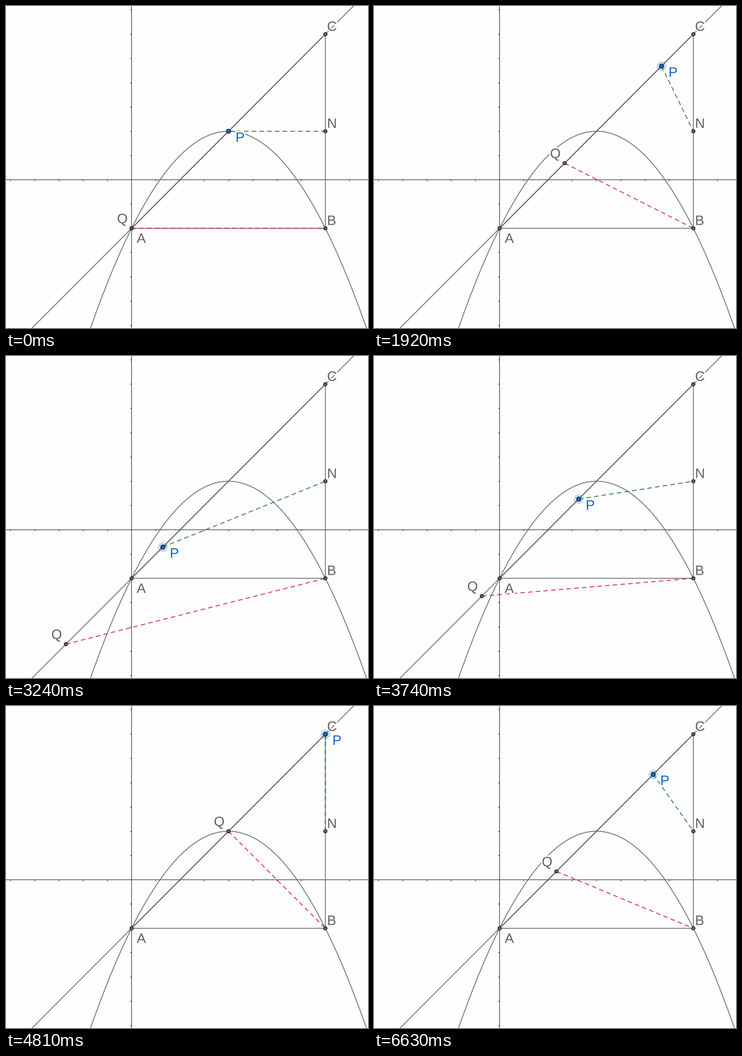
Recreate the animation shown at these times as a matplotlib script. Size 794 by 705 pixels, loop 7.02 s.

```python
import matplotlib.pyplot as plt
import numpy as np
from matplotlib.animation import FuncAnimation
from matplotlib.patches import Circle
from matplotlib.patheffects import withStroke

WIDTH, HEIGHT, DPI = 794, 705, 100
LOOP_MS, FRAME_MS = 7020, 20
DRAG_STEP_MS = 110
PX = 72 / DPI  # points per pixel

PAPER = "#fefefe"
GRAY, BLUE, RED, GREEN = "#616161", "#1565c0", "#d32f2f", "#2e7d32"
UNIT = 53.125
ORIGIN = np.array([275.5, 380.5])


def to_px(x, y):
    return ORIGIN + np.array([x, -y]) * UNIT


A, B, C, N = to_px(0, -2), to_px(8, -2), to_px(8, 6), to_px(8, 2)
VERTEX = to_px(4, 2)
P_TO_Q = A - VERTEX
DIAGONAL = A.sum()  # x + y along the line through A and C

# Drags of P: start ms, end ms, Bezier control x, final x.
DRAGS = [
    (610, 830, 499, 510.5),
    (1210, 1550, 556, 588),
    (1710, 2170, 637, 641),
    (2420, 3000, 487, 381.5),
    (3140, 3740, 280, 449),
    (3850, 4200, 560, 618),
    (4340, 4810, 675, C[0]),
    (5530, 5790, 688, 672.5),
    (6190, 6630, 751, 612.5),
]


def drag_x(t):
    """x of P, which moves in discrete steps along each eased drag."""
    x = VERTEX[0]
    for start, end, pull, target in DRAGS:
        if t < start:
            break
        steps = round((end - start) / DRAG_STEP_MS) + 1
        done = min(1 + (t - start) // DRAG_STEP_MS, steps - 1)
        u = 1 if t >= end else done / steps
        x = (1 - u) ** 2 * x + 2 * u * (1 - u) * pull + u ** 2 * target
    return x


fig = plt.figure(figsize=(WIDTH / DPI, HEIGHT / DPI), dpi=DPI, facecolor=PAPER)
ax = fig.add_axes([0, 0, 1, 1])
ax.set(xlim=(0, WIDTH), ylim=(HEIGHT, 0))
ax.axis("off")


def stroke(xs, ys, color=GRAY, width=2.1, alpha=0.8, z=2, **style):
    return ax.plot(xs, ys, color=color, lw=width * PX, alpha=alpha, zorder=z,
                   solid_capstyle="butt", snap=False, **style)[0]


def segment(start, end, **style):
    return stroke([start[0], end[0]], [start[1], end[1]], **style)


def dashed(color):
    return stroke([], [], color, width=2.2, alpha=0.85, z=3,
                  dashes=(4.6, 3.1), dash_capstyle="butt")


def label(text, pos, color=GRAY, z=4):
    return ax.text(*pos, text, color=color, family="Liberation Sans",
                   size=30 * PX, ha="left", va="baseline", zorder=z,
                   path_effects=[withStroke(linewidth=6 * PX, foreground=PAPER)])


def dot(pos, radius=3.8, color=GRAY, z=5):
    return ax.add_patch(Circle(pos, radius, fc=color, ec="black",
                               lw=1.1 * PX, zorder=z))


def draw_axes():
    ox, oy = ORIGIN
    axis = dict(color="black", width=1, alpha=1, z=1)
    segment((0, oy), (WIDTH, oy), **axis)
    segment((ox, 0), (ox, HEIGHT), **axis)
    for k in range(-7, 10):
        x, y = np.floor(ORIGIN + k * UNIT) + 0.5
        segment((x, oy), (x, oy + 3), **axis)
        segment((ox - 3, y), (ox, y), **axis)


draw_axes()

curve_x = np.linspace(170, WIDTH + 10, 250)
stroke(curve_x, VERTEX[1] + (curve_x - VERTEX[0]) ** 2 / (4 * UNIT))
segment((DIAGONAL + 10, -10), (DIAGONAL - HEIGHT - 10, HEIGHT + 10))
for start, end in ((A, B), (B, C), (A, C)):
    segment(start, end)

label("A", A + (11.2, 32))
for name, point in zip("BCN", (B, C, N)):
    label(name, point + (3.7, -7.3))
for point in (A, B, C, N):
    dot(point)

red_line, green_line = dashed(RED), dashed(GREEN)
q_label, p_label = label("Q", A), label("P", VERTEX, BLUE, z=8)
q_dot = dot(A, z=6)
halo = ax.add_patch(Circle(VERTEX, 10, fc=(0.08, 0.4, 0.75, 0.22),
                           ec=(0.08, 0.4, 0.75, 0.2), lw=PX, zorder=7))
p_dot = dot(VERTEX, 4.7, BLUE, z=9)


def update(frame):
    t = (frame + 0.5) * FRAME_MS
    x = drag_x(t)
    p = np.array([x, DIAGONAL - x])
    q = p + P_TO_Q
    green_line.set_data([p[0], N[0]], [p[1], N[1]])
    red_line.set_data([q[0], B[0]], [q[1], B[1]])
    for circle, center in ((p_dot, p), (halo, p), (q_dot, q)):
        circle.center = center
    halo.set_visible(t >= DRAGS[0][0])
    p_label.set_position(p + (15.4, 23.3))
    q_label.set_position(q + (-32, -11.2))
    return red_line, green_line, q_label, q_dot, halo, p_label, p_dot


anim = FuncAnimation(fig, update, frames=LOOP_MS // FRAME_MS, interval=FRAME_MS,
                     repeat=True, repeat_delay=0, blit=False)
plt.show()
```
